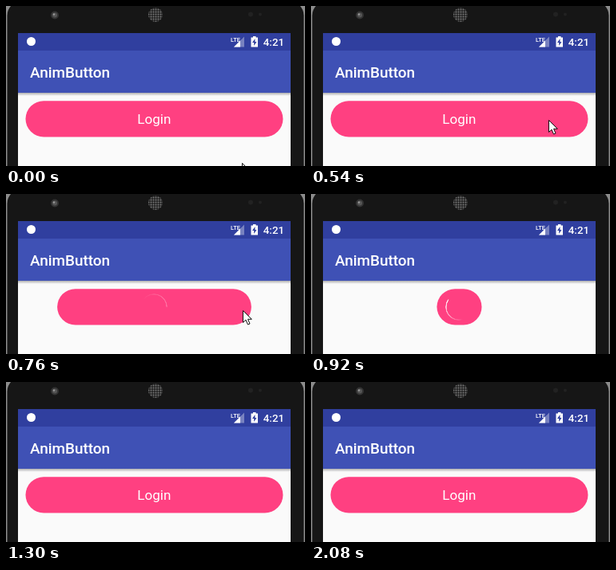
An HTML page that plays this animation: 374 by 201 pixels, repeating every 2550 ms.

```html
<!DOCTYPE html>
<html lang="en">
<head>
<meta charset="utf-8">
<title>Login button</title>
<style>
  html, body { margin: 0; width: 100%; height: 100%; overflow: hidden; }
  body { position: relative; width: 374px; height: 201px; }
  svg { position: absolute; left: 0; top: 0; display: block; }
  text { font-family: Roboto, sans-serif; fill: #fff; }
  .medium { font-weight: 500; }
  #spinner {
    position: absolute; left: 168px; top: 125px; width: 34px; height: 34px;
    border-radius: 50%;
    background: conic-gradient(#fff0 57%, #fff 96%, #fff0 98%);
    -webkit-mask: radial-gradient(circle, #0000 15.2px, #000 15.6px 16.5px, #0000 17px);
    mask: radial-gradient(circle, #0000 15.2px, #000 15.6px 16.5px, #0000 17px);
  }
</style>
</head>
<body>
<svg width="374" height="201" viewBox="0 0 374 201">
  <defs>
    <linearGradient id="shadow" x2="0" y2="1">
      <stop stop-color="#000" stop-opacity=".3"/>
      <stop offset="1" stop-color="#000" stop-opacity="0"/>
    </linearGradient>
    <pattern id="mesh" width="3" height="3" patternUnits="userSpaceOnUse">
      <circle cx="1.5" cy="1.5" r="1" fill="#777"/>
    </pattern>
  </defs>

  <rect width="374" height="201" fill="#8c8c8c"/>
  <rect x="1.5" y="-6" width="371" height="240" rx="18" fill="#161616"/>
  <circle cx="61" cy="11.5" r="5" fill="#333"/>
  <circle cx="61" cy="11.5" r="3" fill="#555"/>
  <circle cx="60" cy="10.5" r="1.2" fill="#999"/>
  <circle cx="187" cy="11" r="9" fill="#222"/>
  <circle cx="187" cy="11" r="9" fill="url(#mesh)"/>
  <circle cx="306" cy="10.5" r="3" fill="#222"/>
  <circle cx="318" cy="10.5" r="2" fill="#222"/>

  <rect x="15" y="34" width="341" height="167" fill="#fafafa"/>
  <rect x="15" y="34" width="341" height="22.5" fill="#303f9f"/>
  <rect x="15" y="56" width="341" height="53" fill="#3f51b5"/>
  <rect x="15" y="109" width="341" height="4" fill="url(#shadow)"/>

  <circle cx="31.5" cy="44.5" r="5.5" fill="#fff"/>
  <text class="medium" x="281" y="44.5" font-size="7.5">LTE</text>
  <path d="M298 38.5V51.5H285Z" fill="#fff" opacity=".35"/>
  <path d="M293 43.5V51.5H285Z" fill="#fff"/>
  <path d="M306.500 39.500h2.500v-1.500h3.500v1.500h2.500v12h-8.500z" fill="#fff"/>
  <path d="M311.500 41l-3.500 5h2.200v4l3.300-5h-2z" fill="#303f9f"/>
  <text class="medium" x="348" y="50" font-size="13.3" text-anchor="end">4:21</text>
  <text class="medium" x="30" y="90" font-size="18.94">AnimButton</text>

  <g id="button">
    <rect id="pill" y="119.200" height="45.300" rx="22.650" fill="#ff4081"/>
    <text id="label" x="185.300" y="148" font-size="17.05" text-anchor="middle">Login</text>
  </g>
</svg>
<div id="spinner"></div>
<svg width="374" height="201" viewBox="0 0 374 201">
  <path id="cursor" d="M.5 .5V15.500L4 12.200L6.500 18L9 17L6.600 11.300H11.300Z" fill="#fff" stroke="#111"/>
</svg>

<script>
const LOOP = 2550, STEP = 77.1, OFFSET = 11.2;
const CENTER = 185.5, FULL = 322, ROUND = 45.3;
const [button, pill, label, spinner, cursor] =
  ["button", "pill", "label", "spinner", "cursor"].map(id => document.getElementById(id));

// Pointer keys: time, x, y
const pointer = [
  [0, 295, 197], [221, 296, 190], [300, 296, 190], [375, 296, 178],
  [452, 297, 152], [528, 297, 143], [684, 296, 143], [760, 296, 146], [837, 297, 182]
];

const phase = (t, start, length) => Math.min(1, Math.max(0, (t - start) / length));
const ease = x => (1 - Math.cos(Math.PI * x)) / 2;

function pointerAt(t) {
  const next = pointer.findIndex(key => key[0] > t);
  if (next < 1) return pointer[pointer.length - 1].slice(1);
  const a = pointer[next - 1], b = pointer[next];
  const x = phase(t, a[0], b[0] - a[0]);
  return [1, 2].map(i => Math.round(a[i] + (b[i] - a[i]) * x));
}

function draw(now) {
  const t = Math.max(0, Math.floor((now % LOOP + OFFSET) / STEP) * STEP - OFFSET);

  const shrink = ease(phase(t, 652, 300)) - ease(phase(t, 972, 300));
  const width = FULL - (FULL - ROUND) * shrink;
  pill.setAttribute("x", CENTER - width / 2);
  pill.setAttribute("width", width);
  label.style.display = shrink > 0.001 ? "none" : "";

  const shake = 3 * Math.sin(Math.PI * phase(t, 1820, 245));
  button.setAttribute("transform", `translate(${shake.toFixed(2)} 0)`);

  const head = t < 914 ? 10 + (t - 760) * 1.4 : 225 + (t - 914);
  spinner.style.opacity = shrink;
  spinner.style.transform = `rotate(${head + 90}deg)`;

  cursor.style.display = t < 900 ? "" : "none";
  cursor.setAttribute("transform", `translate(${pointerAt(t)})`);
}

const start = performance.now();
function tick() {
  draw(performance.now() - start);
  requestAnimationFrame(tick);
}
tick();
</script>
</body>
</html>
```
